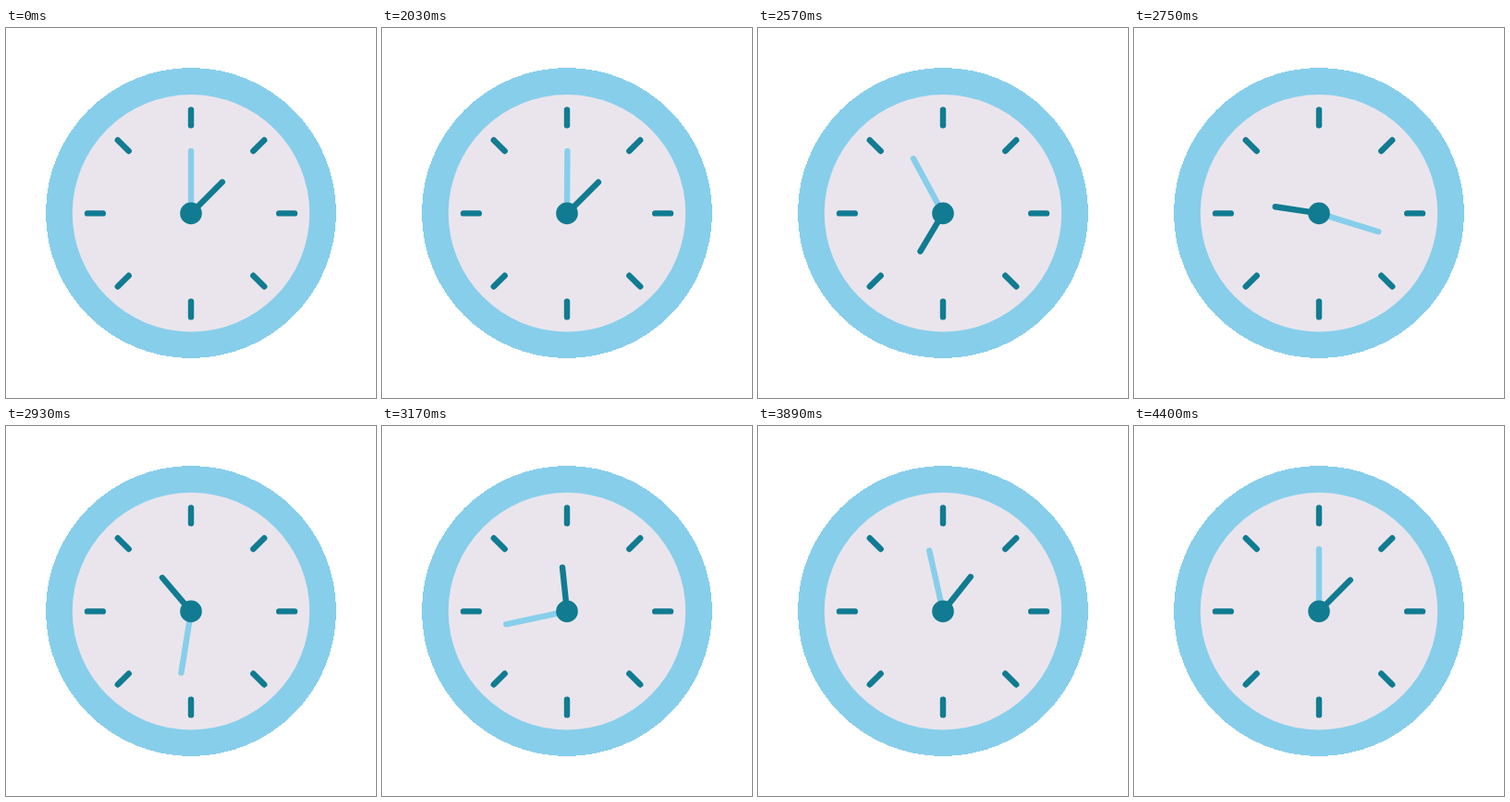
Write an HTML page that moves like this. It is 400 px wide and 400 px high and loops after 4.43 s.

```html
<!DOCTYPE html>
<html lang="en">
<head>
<meta charset="utf-8">
<title>Clock</title>
<style>
  html, body { margin: 0; width: 100%; height: 100%; overflow: hidden; background: #fff; }
  svg { display: block; width: 100vw; height: 100vh; }
  .line { fill: none; stroke-width: 6.4; stroke-linecap: round; }
  .teal { stroke: #107b91; }
  .blue { stroke: #87ceeb; }
</style>
</head>
<body>
<svg viewBox="0 0 400 400">
  <circle cx="200" cy="200" r="157" fill="#87ceeb" shape-rendering="crispEdges"/>
  <path id="rimShade" fill="#66b8e0"/>
  <circle cx="200" cy="200.2" r="128.2" fill="#eae5ec"/>
  <path id="faceShade" fill="#e0d9e3"/>
  <g id="ticks" class="line teal"></g>
  <path id="minute" class="line blue" d="M200 200.4V133.2"/>
  <path id="hour" class="line teal" d="M200 200.4V152.6"/>
  <circle cx="200" cy="200.4" r="11.8" fill="#107b91"/>
</svg>
<script>
  const LOOP = 4430, START = 2000, SPIN = 2400, STEP = 30;
  const CX = 200, CY = 200.4;
  const $ = id => document.getElementById(id);

  // Crescent left when an equal circle shifted by (dx, dy) covers the disc.
  function crescent(cy, r, dx, dy) {
    const d = Math.hypot(dx, dy);
    const k = Math.sqrt(r * r - d * d / 4) / d;
    const mx = CX + dx / 2, my = cy + dy / 2;
    const top = `${mx + dy * k} ${my - dx * k}`;
    const bottom = `${mx - dy * k} ${my + dx * k}`;
    return `M${top}A${r} ${r} 0 0 0 ${bottom}A${r} ${r} 0 0 1 ${top}Z`;
  }
  $('rimShade').setAttribute('d', crescent(200, 157, 14, -8));
  $('faceShade').setAttribute('d', crescent(200.2, 128.2, 27, -16));

  for (let a = 0; a < 360; a += 45) {
    const tick = document.createElementNS('http://www.w3.org/2000/svg', 'path');
    tick.setAttribute('d', `M${CX} ${CY - 112}V${CY - 95.2}`);
    tick.setAttribute('transform', `rotate(${a} ${CX} ${CY})`);
    $('ticks').append(tick);
  }

  // cubic-bezier(1/3, 0, 0, 1)
  function ease(x) {
    let lo = 0, hi = 1;
    for (let i = 0; i < 30; i++) {
      const s = (lo + hi) / 2;
      if (s * (1 - s) ** 2 + s ** 3 < x) lo = s; else hi = s;
    }
    return x >= 1 ? 1 : lo * lo * (3 - 2 * lo);
  }

  const turn = (id, deg) => $(id).setAttribute('transform', `rotate(${deg} ${CX} ${CY})`);

  function draw(now) {
    const t = Math.max(0, now % LOOP - START);
    const p = ease(Math.min(1, Math.floor(t / STEP) * STEP / SPIN));
    turn('minute', 720 * p);
    turn('hour', 45 + 360 * p);
  }

  let origin;
  function tick(now) {
    origin ??= now;
    draw(now - origin);
    requestAnimationFrame(tick);
  }
  draw(0);
  requestAnimationFrame(tick);
</script>
</body>
</html>
```
